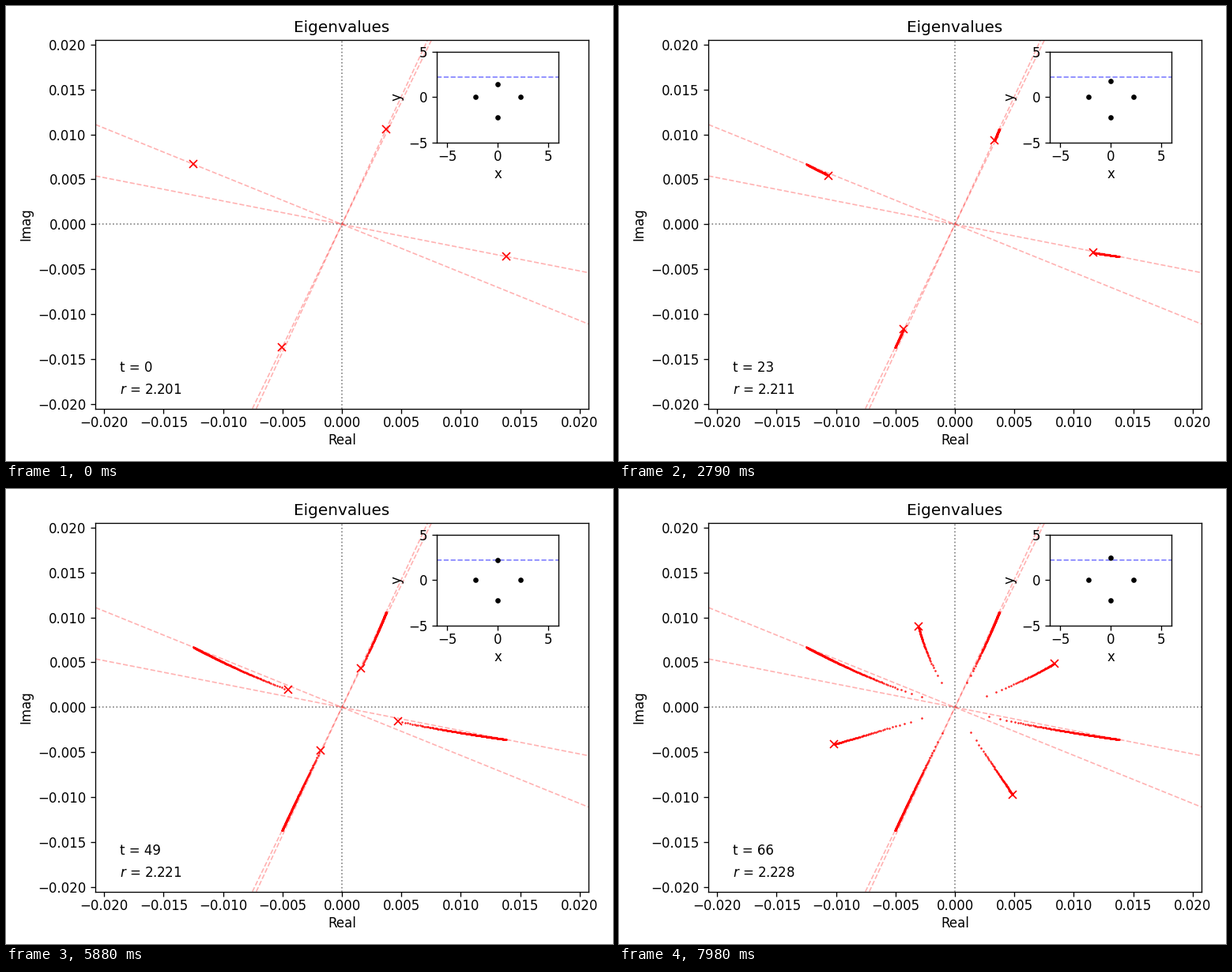
Recreate the animation shown at these times as a matplotlib script. Size 768 by 576 pixels, loop 8 s.

```python
import numpy as np
import matplotlib.pyplot as plt
from matplotlib.animation import FuncAnimation

FRAMES = 267
LOOP_MS = 8000
DPI = 120
STEPS = 399          # length of the full parameter sweep
MID = STEPS / 2      # step at which all eigenvalues merge at zero

# Characteristic polynomial z^4 + s (A z^2 + B z + C), z in units of 1e-3
A, B, C = -14.2 + 24.8j, -1110 - 538j, -4480 + 32840j


def eigenvalues(n):
    s = 1 - n / MID
    return np.roots([1, 0, s * A, s * B, s * C]) * 1e-3


def body_height(n):
    return 1.4 + 1.6 * n / STEPS


def place_labels(axes, y_gap, x_drop=27.1, tick_drop=14.15):
    """Set text baselines at fixed distances (in points) from the axes."""
    box = axes.get_window_extent()
    px = DPI / 72
    axes.tick_params(axis="x", pad=tick_drop - 3.5)
    for label in axes.get_xticklabels():
        label.set_va("baseline")
    axes.xaxis.label.set_va("baseline")
    axes.xaxis.set_label_coords(0.5, -x_drop * px / box.height)
    axes.yaxis.label.set(va="baseline", rotation_mode="anchor")
    axes.yaxis.set_label_coords(-y_gap * px / box.width, 0.5)


eigs = np.array([eigenvalues(n) for n in range(FRAMES)])

plt.rcParams["font.family"] = "DejaVu Sans"
fig, ax = plt.subplots(figsize=(6.4, 4.8), dpi=DPI)
ax.set(title="Eigenvalues", xlabel="Real", ylabel="Imag",
       xlim=(-0.02073, 0.02073), ylim=(-0.02052, 0.02052))
fig.tight_layout()
fig.subplots_adjust(left=113.3 / 768, bottom=66.3 / 576)
place_labels(ax, y_gap=50)

ax.axhline(0, color="k", ls=":", lw=1, alpha=0.5)
ax.axvline(0, color="k", ls=":", lw=1, alpha=0.5)
for z in eigs[0]:
    ax.axline((0, 0), (z.real, z.imag), color="r", ls="--", lw=1, alpha=0.3)

trail, = ax.plot([], [], "r.", ms=1)
marks, = ax.plot([], [], "rx", ms=6)
time_text = ax.text(0.05, 0.10, "", transform=ax.transAxes)
r_text = ax.text(0.05, 0.04, "", transform=ax.transAxes)

inset = fig.add_axes([0.71, 0.7, 0.2, 0.2])
inset.set(xlim=(-6, 6), ylim=(-5, 5), xlabel="x", ylabel="y",
          xticks=(-5, 0, 5), yticks=(-5, 0, 5))
place_labels(inset, y_gap=27.6)
inset.axhline(2.2, color="b", ls="--", lw=1, alpha=0.5)
inset.plot([-2.2, 2.25, 0], [0, 0, -2.25], "k.")
body, = inset.plot([], [], "k.")


def update(n):
    past = eigs[:n].ravel()
    trail.set_data(past.real, past.imag)
    marks.set_data(eigs[n].real, eigs[n].imag)
    body.set_data([0], [body_height(n)])
    time_text.set_text(f"t = {int(100 * n / STEPS)}")
    r_text.set_text(f"$r$ = {2.20145 + 0.04 * n / STEPS:.3f}")
    return trail, marks, body, time_text, r_text


anim = FuncAnimation(fig, update, frames=FRAMES, interval=LOOP_MS / FRAMES,
                     repeat=True, cache_frame_data=False)
plt.show()
```
